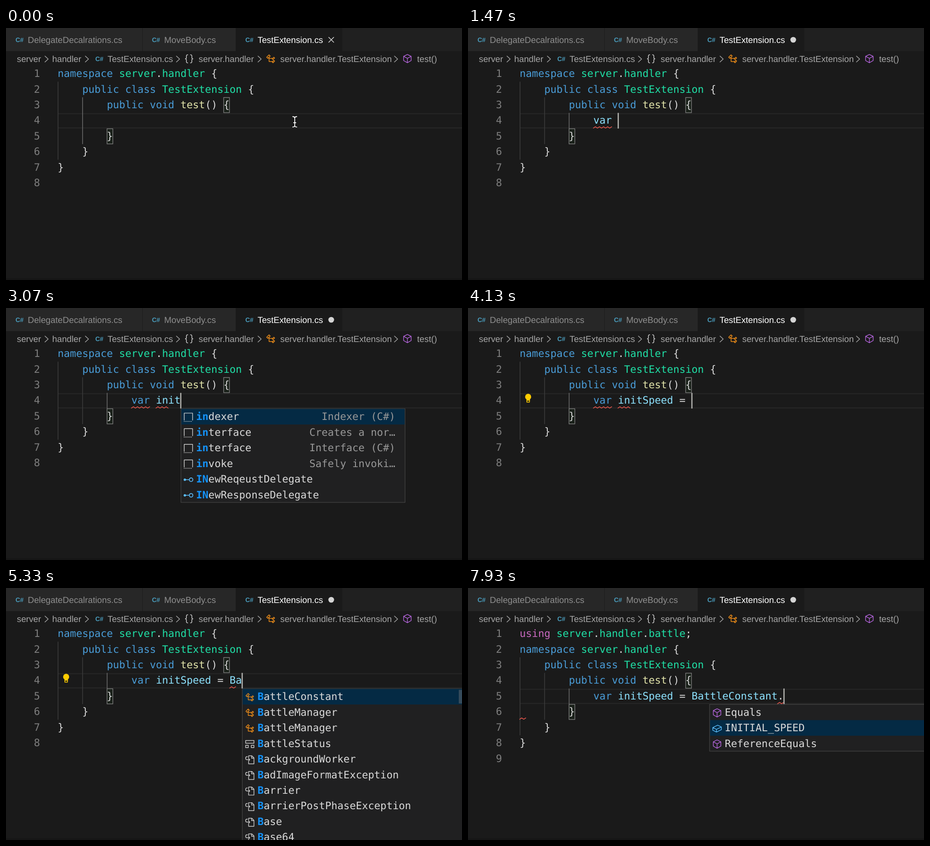
Write an HTML page that moves like this. It is 1006 by 556 pixels and loops after 8 s.

```html
<!DOCTYPE html>
<html lang="en">
<head>
<meta charset="utf-8">
<title>Code editor</title>
<style>
html, body { margin: 0; width: 100%; height: 100%; overflow: hidden; background: #1a1a1a; }
svg { display: block; width: 1006px; height: 556px; }
text { white-space: pre; text-rendering: geometricPrecision; }
.code { font: 22.5px "DejaVu Sans Mono", monospace; fill: #dadada; }
.ui { font: 19.25px "Liberation Sans", Arial, sans-serif; fill: #a6a6a6; }
.lang { font: bold 14px "Liberation Sans", Arial, sans-serif; fill: #4a9cbc; }
.num { fill: #7e7e7e; text-anchor: middle; }
.key { fill: #4a9dd8; }
.type { fill: #20dfa6; }
.fn { fill: #e2e4aa; }
.id { fill: #8de2ff; }
.flow { fill: #c869bf; }
.hit { fill: #1492f8; font-weight: bold; }
.detail { fill: #989898; text-anchor: end; }
.muted { fill: #acacac; }
.line { fill: none; stroke-linecap: round; stroke-linejoin: round; }
</style>
</head>
<body>
<svg id="stage" viewBox="0 0 1006 556"></svg>
<script>
const LOOP = 8000, LEFT = 114, CHAR = 13.545, ROW = 34.44, TOP = 84;
const colX = col => LEFT + col * CHAR;
const rowY = row => TOP + row * ROW;

const rect = (x, y, w, h, fill, extra = '') =>
  `<rect x="${x}" y="${y}" width="${w}" height="${h}" fill="${fill}" ${extra}/>`;
const path = (d, color, width, extra = '') =>
  `<path class="line" d="${d}" stroke="${color}" stroke-width="${width}" ${extra}/>`;
const text = (x, y, cls, body) => `<text x="${x}" y="${y}" class="${cls}">${body}</text>`;
const span = (cls, body) => `<tspan class="${cls}">${body}</tspan>`;

// Marks such as "k:public" colour the word that follows.
const CLASSES = { k: 'key', t: 'type', f: 'fn', p: 'flow' };
const paint = s => s.replace(/\b([ktfp]):(\w+)/g, (_, c, word) => span(CLASSES[c], word));
const paintTyped = (s, keyword) =>
  s.replace(/\w+/g, w => span(w === 'var' && keyword ? 'key' : 'id', w));

// Icons are drawn on a 16 unit grid and scaled.
const ICONS = {
  class: ['#f39019', 'M1.5 5.4 5.3 1.6 7.2 3.4 3.4 7.2ZM5.4 5.5V12.4H10.4M5.4 7.3H10.4M13 5.4 14.3 6.7 11.7 9.3 10.4 8ZM13 10.4 14.3 11.7 11.7 14.3 10.4 13Z'],
  method: ['#b565dd', 'M8 1 14.3 4.2V11.4L8 15 1.7 11.4V4.2ZM1.7 4.2 8 7.6 14.3 4.2M8 7.6V15'],
  field: ['#5cbfff', 'M9 2.5 15.2 5.5V10L7 14 .8 11V6.5ZM.8 6.5 7 9.5 15.2 5.5M7 9.5V14'],
  struct: ['#d0d0d0', 'M1 2H15V6.5H1ZM1 10H5.5V14H1ZM10.5 10H15V14H10.5Z'],
  file: ['#d0d0d0', 'M6 5V1.5H11.5L15 5V15H6V11M11 1.5V5.5H15M8 8H3Q1 8 1 5.5T3 3H4M6 6 8 8 6 10'],
  keyword: ['#d0d0d0', 'M1 3H10V6H1ZM12 4.5H15M1 9H6M9 9H15M1 13H12'],
  snippet: ['#d0d0d0', 'M1 13V1H15V13'],
  interface: ['#5cbfff', 'M4 8H9.5']
};
function icon(kind, x, y, size = 21) {
  const [color, d] = ICONS[kind];
  let body = path(d, color, 1.1);
  if (kind === 'snippet') body += path('M1 15H15', color, 1.3, 'stroke-dasharray="0.1 2.3"');
  if (kind === 'interface')
    body += `<circle cx="2" cy="8" r="2" fill="${color}"/><circle class="line" cx="12.5" cy="8" r="3" stroke="${color}" stroke-width="1.3"/>`;
  return `<g transform="translate(${x} ${y}) scale(${size / 16})">${body}</g>`;
}

const named = (kind, names) => names.split(' ').map(label => ({ kind, label }));
const snippets = list => list.map(([label, detail]) => ({ kind: 'snippet', label, detail }));
const LISTS = {
  v: [...named('keyword', 'var virtual void volatile'),
      ...named('file', 'ValueTuple ValueType Version Volatile VersionConverter Vector')],
  i: [...snippets([['if', 'if statement …'], ['ifd', '#if (C#)'], ['indexer', 'Indexer (C#)'],
        ['interface', 'Creates a nor…'], ['interface', 'Interface (C#)'], ['invoke', 'Safely invoki…'],
        ['iterator', 'Simple iterat…'], ['iterindex', 'Named iterato…']]),
      ...named('interface', 'INewReqeustDelegate INewResponseDelegate')],
  B: [...named('class', 'BattleConstant BattleManager BattleManager'), ...named('struct', 'BattleStatus'),
      ...named('file', 'BackgroundWorker BadImageFormatException Barrier BarrierPostPhaseException Base Base64')],
  dot: [...named('method', 'Equals'), ...named('field', 'INITIAL_SPEED'), ...named('method', 'ReferenceEquals')]
};
const DOCS = {
  var: { width: 174, height: ROW + 10, lines: [[0, span('muted', 'var Keyword')]] },
  if: { width: 260, height: 210.5, lines: [[0, span('muted', 'if statement')],
    [58.3, `${span('flow', 'if')} (${span('key', 'true')})`], [92.5, '{'], [161.5, '}']] }
};

// Each step changes some fields of the editor state.
const STEPS = [
  [0, { code: '', caret: false, mouse: true, dirty: false, nested: false, keyword: false,
        bulb: false, marks: [], list: null, query: '', doc: null, pick: 0, using: false }],
  [70, { code: 'v', caret: true, mouse: false, dirty: true }],
  [600, { list: 'v', query: 'v', doc: 'var', nested: true }],
  [800, { code: 'va', query: 'va', doc: null }],
  [930, { code: 'var', query: 'var' }],
  [1130, { code: 'var ', list: null }],
  [1470, { marks: [[12, 3]] }],
  [1670, { caret: false }],
  [1930, { code: 'var i', caret: true }],
  [2400, { list: 'i', query: 'i', doc: 'if' }],
  [2600, { code: 'var in', query: 'in', doc: null, keyword: true }],
  [2800, { code: 'var ini' }],
  [2930, { code: 'var init', marks: [[12, 3], [16, 2]] }],
  [3130, { code: 'var initS', bulb: true }],
  [3270, { code: 'var initSp', list: null }],
  [3400, { code: 'var initSpe' }],
  [3530, { code: 'var initSpee' }],
  [3670, { code: 'var initSpeed' }],
  [3870, { code: 'var initSpeed =' }],
  [4070, { code: 'var initSpeed = ' }],
  [4330, { code: 'var initSpeed = B', bulb: false }],
  [4730, { list: 'B', query: 'B', marks: [[28, 1]] }],
  [4870, { bulb: true }],
  [5200, { code: 'var initSpeed = Ba' }],
  [5400, { query: 'Ba' }],
  [5600, { code: 'var initSpeed = Bat', query: 'Bat' }],
  [5800, { code: 'var initSpeed = BattleConstant', list: null, bulb: false, marks: [[28, 14]] }],
  [6270, { bulb: true }],
  [6530, { caret: false }],
  [7000, { caret: true }],
  [7200, { code: 'var initSpeed = BattleConstant.', bulb: false, marks: [] }],
  [7330, { using: true }],
  [7530, { list: 'dot', query: '', pick: 1 }],
  [7800, { marks: [[42, 1], [0, 1, 1]] }]
];
const stateAt = t => Object.assign({}, ...STEPS.filter(s => s[0] <= t).map(s => s[1]));

function header(dirty) {
  const tab = (x, name, color) =>
    text(x, 31, 'lang', 'C#') + `<text x="${x + 27}" y="33" class="ui" style="fill:${color}">${name}</text>`;
  const crumb = (x, name) => text(x, 75, 'ui', name);
  const chevrons = [86, 175, 376, 556, 857]
    .map(x => path(`M${x} 62l7 6.5-7 6.5`, '#a6a6a6', 1.6)).join('');
  const brace = (x, s) => path(`M${x} 59q${-3 * s} 0 ${-3 * s} 3v3q0 3 ${-2.5 * s} 3q${2.5 * s} 0 ${2.5 * s} 3v3q0 3 ${3 * s} 3`, '#c8c8c8', 1.6);
  return rect(0, 0, 1006, 51, '#202020') + rect(0, 0, 300.5, 51, '#272727') +
    rect(302, 0, 204.5, 51, '#272727') + rect(507, 0, 235, 51, '#1a1a1a') +
    tab(21, 'DelegateDecalrations.cs', '#8e8e8e') + tab(322, 'MoveBody.cs', '#8e8e8e') +
    tab(528, 'TestExtension.cs', '#fff') +
    (dirty ? '<circle cx="717.5" cy="26" r="6.3" fill="#d4d4d4"/>'
           : path('M712 20.5l11 11M723 20.5l-11 11', '#d4d4d4', 1.6)) +
    crumb(24, 'server') + crumb(102, 'handler') + text(197, 73, 'lang', 'C#') +
    crumb(224, 'TestExtension.cs') + crumb(425, 'server.handler') +
    crumb(605, 'server.handler.TestExtension') + crumb(907, 'test()') +
    chevrons + brace(401, 1) + brace(407, -1) + icon('class', 573, 57, 22) + icon('method', 875, 57, 21);
}

function squiggle(col, length, row) {
  const x = colX(col), y = rowY(row) + 33.5;
  let d = `M${x} ${y}`;
  for (let i = 1; i * 4.5 <= length * CHAR + 1; i++) d += `L${x + i * 4.5} ${y + (i % 2 ? -3 : 0)}`;
  return path(d, '#f05a50', 1.5);
}

function popup(s, line) {
  const items = LISTS[s.list].filter(i => i.label.toLowerCase().startsWith(s.query.toLowerCase()));
  const x = Math.min(colX(12 + s.code.length) + 1, 533), y = rowY(line + 1), w = 494.5;
  const frame = (fx, fw, fh) => rect(fx, y + .5, fw, fh, '#202021', 'stroke="#424242" stroke-width="1.3"');
  let out = frame(x, w, items.length * ROW);
  items.forEach((item, i) => {
    const top = y + .8 + i * ROW, n = s.query.length;
    if (i === s.pick) out += rect(x + 1, top, w - 2, ROW, '#042a44');
    out += icon(item.kind, x + 6, top + 8) +
      text(x + 33.6, top + 24.8, 'code', span('hit', item.label.slice(0, n)) + item.label.slice(n));
    if (item.detail) out += text(x + 473, top + 24.8, 'code detail', item.detail);
  });
  if (items.length > 9)
    out += rect(x + 477.5, y + (s.list === 'B' ? 3 : 0), 16, s.list === 'B' ? 30 : 248, '#797979', 'opacity=".42"');
  if (s.doc) {
    const doc = DOCS[s.doc], dx = x + w;
    out += frame(dx, doc.width, doc.height) +
      doc.lines.map(([dy, body]) => text(dx + 9.5, y + 30.5 + dy, 'code', body)).join('');
  }
  return out;
}

function draw(s) {
  const shift = s.using ? 1 : 0, line = 3 + shift;
  const lines = ['k:namespace t:server.t:handler {', '    k:public k:class t:TestExtension {',
    '        k:public k:void f:test() {', '', '        }', '    }', '}', ''].map(paint);
  lines[3] = ' '.repeat(12) + paintTyped(s.code, s.keyword);
  if (s.using) lines.unshift(paint('p:using t:server.t:handler.t:battle;'));

  const y = rowY(line);
  const guide = (col, from, rows, active) =>
    rect(colX(col), rowY(from + shift), 1.5, rows * ROW, active ? '#707070' : '#3d3d3d');
  const bracket = (col, row) => rect(colX(col) + .5, rowY(row + shift) + .5, 12.8, 33.4,
    '#1a211a', 'stroke="#858585" stroke-width="1.3"');

  let out = rect(0, 0, 1006, 556, '#1a1a1a') + rect(0, 552, 1006, 4, '#161616') + header(s.dirty) +
    rect(LEFT, y + .5, 900, 2.5, '#252525') + rect(LEFT, y + 31.8, 900, 2.5, '#252525') +
    guide(0, 1, 5, false) + guide(4, 2, 3, !s.nested) + (s.nested ? guide(8, 3, 1, true) : '') +
    bracket(27, 2) + bracket(8, 4);
  lines.forEach((body, i) => {
    const base = rowY(i) + 24.1;
    out += text(68.3, base, 'code num', i + 1) + text(LEFT, base, 'code', body);
  });
  s.marks.forEach(([col, length, down = 0]) => out += squiggle(col, length, line + down));
  if (s.bulb)
    out += `<circle cx="132.7" cy="${y + 8.7}" r="6.7" fill="#ffcc00"/>` + rect(129, y + 12, 7.5, 5, '#ffcc00') +
      path(`M129.8 ${y + 15}V${y + 20.5}H135.6V${y + 15}`, '#ffcc00', 1.6);
  if (s.caret) out += rect(colX(12 + s.code.length) - .6, y, 2.6, ROW, '#b4b4b0');
  if (s.list) out += popup(s, line);
  if (s.mouse) {
    const beam = 'M632.5 195.5Q637 195.5 637 199V215Q637 218.5 632.5 218.5M641.5 195.5Q637 195.5 637 199M637 215Q637 218.5 641.5 218.5M634.5 209H639.5';
    out += path(beam, '#111', 4) + path(beam, '#fff', 1.8);
  }
  return out;
}

const stage = document.getElementById('stage');
let shown = -1;
function tick() {
  const t = performance.now() % LOOP;
  const step = STEPS.filter(s => s[0] <= t).length;
  if (step !== shown) {
    shown = step;
    stage.innerHTML = draw(stateAt(t));
  }
  requestAnimationFrame(tick);
}
tick();
</script>
</body>
</html>
```
